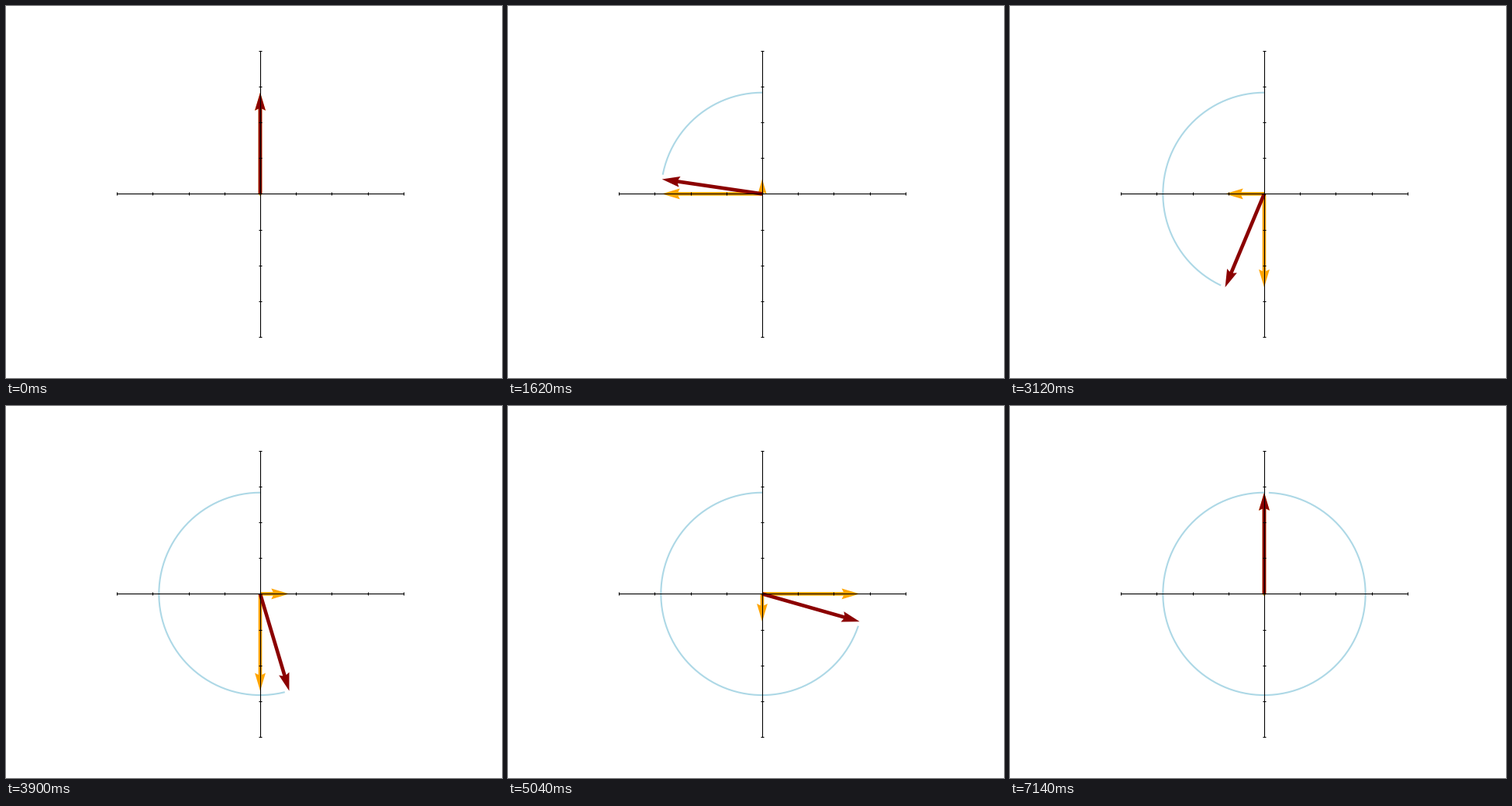
These frames come from a looping animation (640 px wide and 480 px high, 7.2 s). A matplotlib script:

```python
import numpy as np
import matplotlib.pyplot as plt
from matplotlib.animation import FuncAnimation

FRAMES = 120
INTERVAL = 60
LIMIT = 4
RADIUS = 2 * np.sqrt(2)

angle = np.linspace(0, 2 * np.pi, FRAMES)
xs = -RADIUS * np.sin(angle)
ys = RADIUS * np.cos(angle)

fig, ax = plt.subplots(figsize=(6.4, 4.8), dpi=100)
ax.set_aspect("equal")
ax.set_xlim(-LIMIT, LIMIT)
ax.set_ylim(-LIMIT, LIMIT)

# Axes cross at the origin
ax.spines[["left", "bottom"]].set_position("zero")
ax.spines[["right", "top"]].set_visible(False)
ticks = np.arange(-LIMIT, LIMIT + 1)
ax.set_xticks(ticks)
ax.set_yticks(ticks)
ax.tick_params(direction="inout", labelbottom=False, labelleft=False)

# x component, y component and their sum
arrows = ax.quiver(
    np.zeros(3), np.zeros(3), [0, 0, 0], [0, RADIUS, RADIUS],
    color=["orange", "orange", "darkred"],
    angles="xy", scale_units="xy", scale=1, units="xy", width=0.1,
)
trail, = ax.plot([], [], color="lightblue")


def update(i):
    x, y = xs[i], ys[i]
    arrows.set_UVC([x, 0, x], [0, y, y])
    trail.set_data(xs[:i], ys[:i])
    return arrows, trail


anim = FuncAnimation(fig, update, frames=FRAMES, interval=INTERVAL,
                     repeat=True, repeat_delay=0)
plt.show()
```
